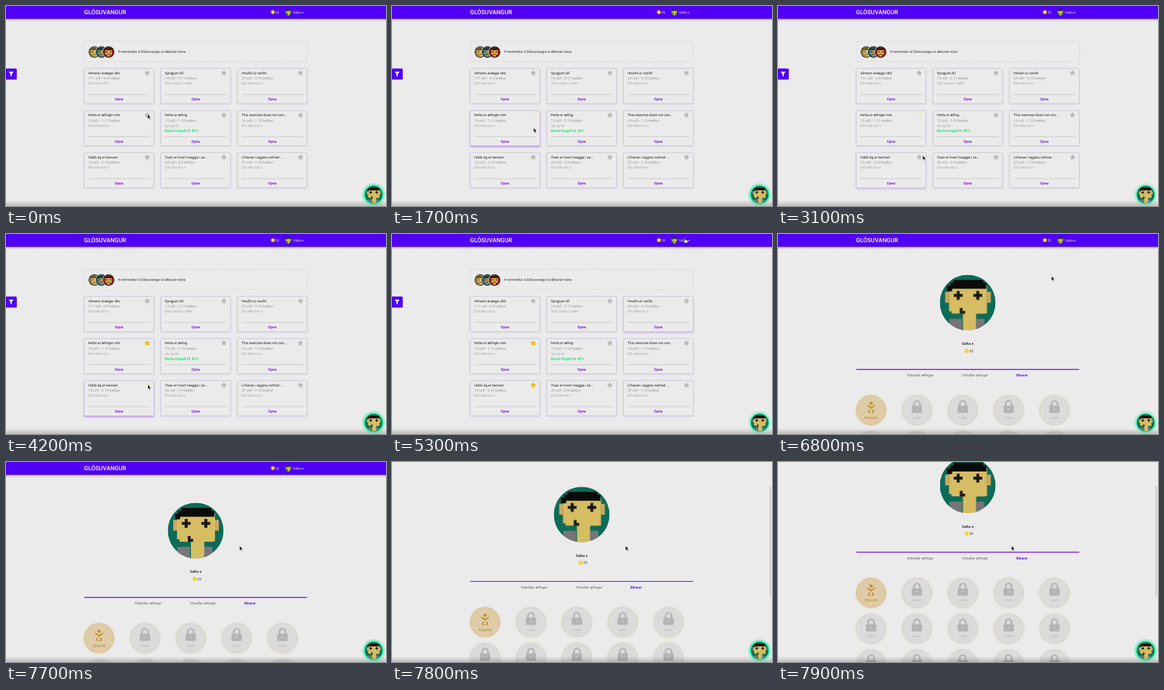
Animation of 600x316 px, one loop 8000 ms. Source, as an HTML page:

```html
<!DOCTYPE html>
<html lang="is">
<head>
<meta charset="utf-8">
<title>Glósuvangur</title>
<style>
  html, body { margin: 0; width: 100%; height: 100%; overflow: hidden; background: #ebebeb; }
  svg { display: block; width: 100vw; height: 100vh; }
  text { font: 5.65px Roboto, Arial, sans-serif; text-rendering: geometricPrecision; }
  .b { font-weight: 500; }
  .mid { text-anchor: middle; }
</style>
</head>
<body>
<svg id="stage" viewBox="0 0 600 316">
  <defs>
    <linearGradient id="drop" x2="0" y2="1">
      <stop stop-color="#2a1466" stop-opacity=".38"/>
      <stop offset=".4" stop-color="#444" stop-opacity=".12"/>
      <stop offset="1" stop-color="#444" stop-opacity="0"/>
    </linearGradient>
    <linearGradient id="floor" x2="0" y2="1">
      <stop stop-color="#000" stop-opacity="0"/>
      <stop offset="1" stop-color="#000" stop-opacity=".2"/>
    </linearGradient>
    <radialGradient id="halo">
      <stop offset=".7" stop-color="#00e58d" stop-opacity=".95"/>
      <stop offset=".82" stop-color="#00e58d" stop-opacity=".4"/>
      <stop offset="1" stop-color="#00e58d" stop-opacity="0"/>
    </radialGradient>
    <filter id="soft" x="-30%" y="-30%" width="160%" height="160%"><feGaussianBlur stdDeviation="1.5"/></filter>
    <clipPath id="disc"><circle r="44"/></clipPath>
    <g id="face" clip-path="url(#disc)">
      <path fill="#0d6b57" d="M-44-44h88v88h-88z"/>
      <path fill="#d6bd64" d="M-29.5-27h60v44h-4v4.500h-13v23h-21v-27h-18v-4h-4z"/>
      <path fill="#d0a860" d="M-35.500-17h6v17h-6zM30.500-17h6v17h-6z"/>
      <path fill="#0d6b57" d="M-29.500 17.500h21v8h-21zM13.500 17.500h17v8h-17z"/>
      <path fill="#777579" d="M-29 25.500h20v19h-20zM13.500 25.500h13v19h-13z"/>
      <path fill="#090a09" d="M-22.500-36h47v4.500h5v9.500h-54v4h-8v-9h5v-4.500h5z"/>
      <path stroke="#17150c" stroke-width="4.600" d="M-22-11.500h14m-7-7v14M9-11.500h14m-7-7v14"/>
      <path fill="#211b10" d="M-12.500 8.500h4.500v4.500h4v4.500h-8.500z"/>
    </g>
    <g id="lock">
      <path fill="none" stroke="#b4b4b5" stroke-width="2.600" d="M-4.700-3v-4a4.700 4.700 0 0 1 9.400 0v4"/>
      <rect x="-8.200" y="-4" width="16.400" height="11.500" rx="1.800" fill="#b4b4b5"/>
      <circle cy="1.500" r="1.100" fill="#d5d5d6"/>
    </g>
  </defs>
  <rect width="600" height="316" fill="#ebebeb"/>
  <g id="page">
    <g id="home"></g>
    <g id="profile"></g>
    <g id="header"></g>
  </g>
  <g id="menu"></g>
  <rect y="307" width="600" height="9" fill="url(#floor)"/>
  <rect id="bar" x="595.800" y="38" width="3" height="176" rx="1.500" fill="#d2d2d2"/>
  <circle id="glow" cx="580.500" cy="298" r="19.500" fill="url(#halo)"/>
  <circle cx="580.500" cy="298" r="14.600" fill="#00df8e"/>
  <use href="#face" transform="translate(580.500 298) scale(.305)"/>
  <g id="cursor">
    <path id="arrow" fill="#000" stroke="#fff" stroke-width=".6" d="M0 0v7.200l1.700-1.500 1.200 2.700 1.300-.6-1.200-2.600h2.200z"/>
    <path id="hand" fill="#fff" stroke="#111" stroke-width=".7" stroke-linejoin="round"
      d="M-1.200-3.300q.8-.8 1.400 0v2.500l3.200.7q.8.300.7 1.200l-.5 3.200h-4l-2.700-3q-.2-1 .8-.8l1.100.8z"/>
  </g>
</svg>
<script>
const LOOP = 8000, FRAME = 100;
const VIOLET = '#5000f2', GOLD = '#f2c40c', USER = 'Salka e';
const $ = id => document.getElementById(id);
const text = (x, y, s, fill = '#222', cls = '', extra = '') =>
  `<text x="${x}" y="${y}" fill="${fill}" class="${cls}" ${extra}>${s}</text>`;
const coin = (x, y) =>
  `<circle cx="${x}" cy="${y}" r="2.800" fill="#ffdf18" stroke="#e8ae08" stroke-width=".6"/>`;
const clamp = v => Math.max(0, Math.min(1, v));
const ramp = (t, from, to) => clamp((t - from) / (to - from));
const ease = p => p * p * (3 - 2 * p);

const starPath = 'M' + Array.from({ length: 10 }, (_, i) => {
  const r = i % 2 ? 2.1 : 4.3, a = (i / 5 - .5) * Math.PI;
  return (r * Math.cos(a)).toFixed(2) + ' ' + (r * Math.sin(a)).toFixed(2);
}).join('L') + 'Z';

const NOTE = 'Eitt eða tvö n';
const cards = [
  ['Almenn ánægja ríkti', '111 orð • 6-9 bekkur', NOTE],
  ['Syngjum öll', '14 orð • 5-11 bekkur', 'Stór stafur í nafni'],
  ['Hnoðri úr norðri', '24 orð • 5-10 bekkur', NOTE],
  ['Þetta er æfingin mín', '15 orð • 1-11 bekkur', NOTE],
  ['Þetta er æfing', '15 orð • 1-10 bekkur', 'ng og nk', 'Besta hingað til: 85%'],
  ['This exercise does not con...', '16 orð • 1-10 bekkur', NOTE],
  ['Halló ég er kennari', '15 orð • 2-10 bekkur', NOTE],
  ['Ýsan er hvort tveggja í se...', '43 orð • 2-9 bekkur', NOTE],
  ['Lífveran í egginu nefnist ...', '37 orð • 1-10 bekkur', NOTE]
];

function card([title, meta, note, best], i) {
  const x = 123.5 + i % 3 * 121, y = 98.7 + Math.floor(i / 3) * 66.5;
  return `<g transform="translate(${x} ${y})">
    <rect y="1" width="110" height="55.500" rx="1.500" fill="#b9b4d2" opacity=".55" filter="url(#soft)"/>
    <rect id="hover${i}" y="1.500" width="110" height="56" rx="1.500" fill="#b57be8" filter="url(#soft)"/>
    <rect width="110" height="55.500" rx="1" fill="#ebebeb" stroke="#c3c1d3" stroke-width=".8"/>
    ${text(6.5, 9, title)}${text(6.5, 17.5, meta, '#969696')}${text(6.5, 25.8, note, '#a6a6a6')}
    ${best ? text(6.5, 33.9, best, '#00e866', 'b') : ''}
    <path d="M6.500 41.200h97.500" stroke="#bcbcbc" stroke-width=".7"/>
    ${text(55, 50.4, 'Opna', '#6a00e0', 'b mid')}
    <path id="star${i}" transform="translate(99.500 7.200)" d="${starPath}" fill="#b9b9ba" stroke="#b9b9ba" stroke-width=".6" stroke-linejoin="round"/>
    <path id="spin${i}" d="M.8-1.400A1.600 1.600 0 0 1 .8 1.400" fill="none" stroke="${GOLD}" stroke-width=".9"/>
  </g>`;
}

// A small badge portrait: backdrop, face and stripe colours
const portrait = (x, back, skin, stripe) => `<g transform="translate(${x} 72.800)">
    <circle r="9.800" fill="#fff"/><circle r="9.200" fill="#222"/><circle r="8.400" fill="${back}"/>
    <path fill="${skin}" d="M-5-4h10v8h-3v3h-4v-3h-3z"/>
    <path fill="${stripe}" d="M-6-6h12v3h-12zM-4-1h2.500v1.500h-2.500zM1.500-1h2.500v1.500h-2.500zM-2 3h4v1h-4z"/>
  </g>`;

$('home').innerHTML = `
  <rect x="123.500" y="55.700" width="352" height="32.300" rx="1.500" fill="none" stroke="#c9c9c9" stroke-width=".7" stroke-dasharray="2 1.500"/>
  ${portrait(139.5, '#8d7438', '#d2b56a', '#5c4a20')}
  ${portrait(150.8, '#17687a', '#b78e4b', '#12343d')}
  ${portrait(162, '#8c2418', '#d9b25a', '#35120c')}
  ${text(176.8, 73.6, '4 nemendur á Glósuvangur.is ákkurat núna', '#333')}
  <path fill="${VIOLET}" d="M0 98.700h15.500q1.500 0 1.500 1.500v14.500q0 1.500-1.500 1.500h-15.500z"/>
  <path fill="#fff" d="M4.200 103.700h7.800l-3 3.700v4l-1.800-1.200v-2.800z"/>
  ${cards.map(card).join('')}`;

function medal(i) {
  const first = i === 0, x = 147 + i % 5 * 72.4, y = 278.4 + Math.floor(i / 5) * 56.5;
  const icon = first
    ? `<g fill="none" stroke="#c19632" stroke-width="2" stroke-linecap="round">
        <circle cy="-11" r="2.200" fill="#c19632" stroke-width="1"/>
        <path d="M-5.500-7.500 -2-5h4l3.500-2.500M0-4.500v2M-2.500 0-4 2.500-2 4M2.500 0 4 2.500 2 4"/></g>`
    : '<use href="#lock" y="-3.200"/>';
  return `<g transform="translate(${x} ${y})">
    <circle r="24" fill="#d9cba6" opacity=".6" filter="url(#soft)"/>
    <circle r="23.300" fill="${first ? '#dfcba8' : '#dbdbdc'}" stroke="${first ? '#d6b875' : '#d6d0c2'}" stroke-width=".8"/>
    ${icon}${text(0, 13.6, first ? 'Byrjandi' : 'Læst', first ? '#ae862d' : '#b6b6b7', 'mid')}
  </g>`;
}

$('profile').innerHTML = `
  <use href="#face" x="299.500" y="108.500"/>
  ${text(299.5, 175.4, USER, '#222', 'b mid')}
  ${coin(297.8, 184.6)}${text(302, 186.5, '20', '#444')}
  <path d="M123.500 214h352" stroke="#7a12f0" stroke-width="1.300"/>
  ${text(224.7, 225.4, 'Kláraðar æfingar', '#666', 'mid')}
  ${text(311, 225.4, 'Vistaðar æfingar', '#666', 'mid')}
  ${text(385.3, 225.4, 'Bikarar', VIOLET, 'b mid')}
  ${Array.from({ length: 15 }, (_, i) => medal(i)).join('')}`;

$('header').innerHTML = `
  <rect y="20" width="600" height="5" fill="url(#drop)"/>
  <rect width="600" height="20.300" fill="${VIOLET}"/>
  ${text(123.3, 12.8, 'GLÓSUVANGUR', '#fff', 'b', 'style="font-size:9.4px"')}
  ${coin(421.4, 9.7)}${text(425.6, 11.6, '20', '#e9ddff', '', 'style="font-size:5.2px"')}
  <use href="#face" transform="translate(445.800 9.800) scale(.118)"/>
  ${text(453.3, 11.7, USER, '#e9ddff', '', 'style="font-size:5.2px"')}`;

$('menu').innerHTML = `
  <rect x="437.500" y="21" width="71.500" height="72" rx="1" fill="#555" opacity=".5" filter="url(#soft)"/>
  <rect x="438" y="20" width="70.500" height="71.500" rx="1" fill="#ebebeb"/>
  <rect id="item" x="438" y="20" width="70.500" height="24" fill="#d9d9d9"/>
  <path d="M438 44h70.500M438 68h70.500" stroke="#d8d8d8" stroke-width=".5"/>
  <circle cx="449.800" cy="32" r="4.700" fill="#777"/>
  <circle cx="449.800" cy="30.300" r="1.500" fill="#e4e4e4"/>
  <path d="M446.900 34.600q2.900-3 5.800 0-2.900 2.600-5.800 0z" fill="#e4e4e4"/>
  <path d="M445.300 52.800h9.300M445.300 56h9.300M445.300 59.200h9.300M452 51.500v2.600M447.800 54.700v2.600M451 57.900v2.600" stroke="#777" stroke-width="1.100"/>
  <path d="M449 76h-3.300v7h3.300M448 79.500h5.300M451.200 76.800l2.700 2.700-2.700 2.700" fill="none" stroke="#666" stroke-width="1.300"/>
  ${text(457.5, 32, 'Minn prófíll')}${text(457.5, 56, 'Stillingar')}${text(457.5, 80, 'Skrá út')}`;

// time, x, y
const path = [
  [0, 223.5, 171], [1200, 223.5, 171], [1700, 223.5, 192.5], [2300, 224, 200],
  [2900, 228.3, 236], [3400, 228.3, 236], [3700, 224, 238], [4300, 224, 238],
  [5200, 463, 10], [5600, 463, 10], [6000, 461, 35.5], [6200, 461, 35.5],
  [6300, 461, 36], [6500, 461, 36], [7300, 368.8, 132.5], [LOOP, 368.8, 132.5]
];

function cursorAt(t) {
  const n = Math.max(1, path.findIndex(p => p[0] > t));
  const [t0, x0, y0] = path[n - 1], [t1, x1, y1] = path[n];
  const k = ease(ramp(t, t0, t1));
  return [x0 + (x1 - x0) * k, y0 + (y1 - y0) * k];
}

// card, pointer enters, pointer leaves
const hovers = [[3, 1200, 2400], [6, 3000, 4400], [2, 4700, 5100]];
// card, saving starts, saved
const saves = [[3, 1000, 3600], [6, 3700, 4900]];
const show = (id, on) => $(id).setAttribute('opacity', +on);

function draw(t) {
  cards.forEach((_, i) => { show('hover' + i, 0); show('spin' + i, 0); });
  for (const [i, from, to] of hovers)
    show('hover' + i, .8 * ramp(t, from, from + 300) * (1 - ramp(t, to, to + 400)));

  const angle = 180 + (t - 1700) * 450 / 1400;
  for (const [i, from, to] of saves) {
    const busy = t >= from && t < to, star = $('star' + i);
    show('star' + i, !busy);
    show('spin' + i, busy);
    $('spin' + i).setAttribute('transform', `translate(101.700 7.800) rotate(${angle})`);
    star.setAttribute('fill', t >= to ? GOLD : '#b9b9ba');
    star.setAttribute('stroke', t >= to ? '#e2a90c' : '#b9b9ba');
  }

  const onProfile = t >= 6800;
  show('home', !onProfile);
  show('profile', onProfile);
  show('menu', ramp(t, 5400, 5700) * (1 - ramp(t, 6500, 6800)));
  show('item', ramp(t, 5700, 5900));

  const scroll = 71.5 * Math.pow(ramp(t, 7700, 7900), 1.5);
  $('page').setAttribute('transform', `translate(0 ${-scroll})`);
  show('bar', scroll > 0);

  const [x, y] = cursorAt(t), pointing = t >= 5100 && t < 6700;
  $('cursor').setAttribute('transform', `translate(${x} ${y})`);
  show('arrow', !pointing);
  show('hand', pointing);
  show('glow', .75 + .2 * Math.cos(t / LOOP * 8 * Math.PI));
}

const start = performance.now();
function tick() {
  const t = (performance.now() - start) % LOOP;
  draw(Math.floor(t / FRAME) * FRAME);
  requestAnimationFrame(tick);
}
tick();
</script>
</body>
</html>
```
